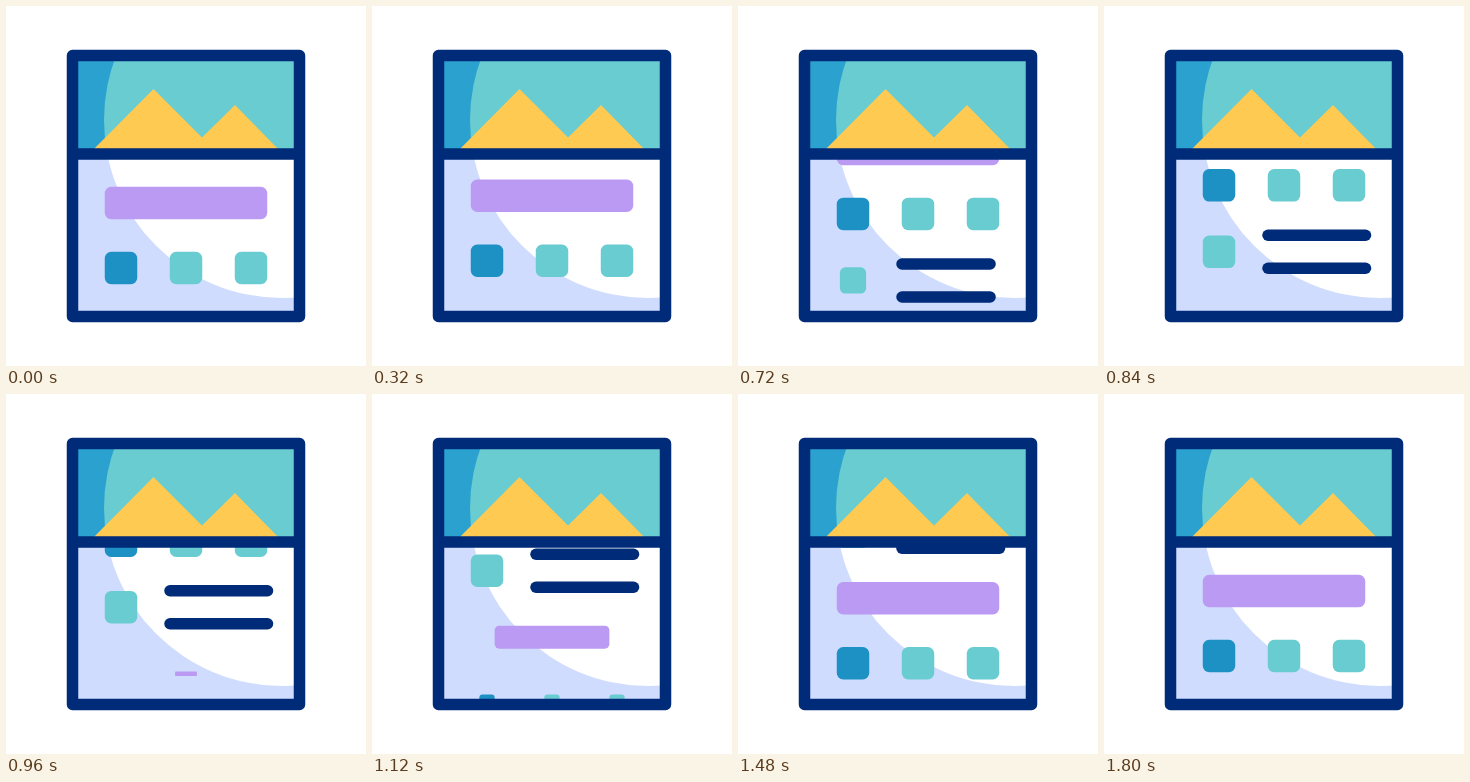
Recreate the animation shown at these times as an HTML page. Size 360 by 360 pixels, loop 2000 ms.

```html
<!DOCTYPE html>
<html lang="en">
<head>
<meta charset="utf-8">
<title>Scrolling page</title>
<style>
html, body { margin: 0; width: 100%; height: 100%; overflow: hidden; background: #fff; }
svg { display: block; width: 100vw; height: 100vh; }
</style>
</head>
<body>
<svg viewBox="0 0 360 360">
  <defs>
    <clipPath id="top"><path d="M66 49H294V148H66z"/></clipPath>
    <clipPath id="body"><path d="M66 148H294V310H66z"/></clipPath>
  </defs>
  <g clip-path="url(#top)">
    <path fill="#2aa1cf" d="M66 49H294V148H66z"/>
    <circle cx="276" cy="114" r="178" fill="#68ccd1"/>
    <path fill="#ffca51" d="M83 148 147.500 83 196 131.500 229 99 277 148z"/>
  </g>
  <g clip-path="url(#body)">
    <path fill="#d0dcfe" d="M66 148H294V310H66z"/>
    <circle cx="276" cy="114" r="178" fill="#fff"/>
    <g id="page"></g>
  </g>
  <path fill="none" stroke="#002b79" stroke-width="11.500" stroke-linejoin="round"
    d="M66.500 49.500H293.500V310.500H66.500zM66.500 148H293.500"/>
</svg>
<script>
const LOOP = 2000, STEP = 40, SCROLL_TIME = 1800, DISTANCE = 198, GROW_TIME = 390;
const TEAL = '#68ccd1', BLUE = '#1d90c4', PURPLE = '#bb9af4', NAVY = '#002b79';
const page = document.getElementById('page');
const growers = [];

const clamp = v => Math.min(1, Math.max(0, v));
const smooth = v => v * v * (3 - 2 * v);

// cubic-bezier(.6, 0, .4, 1), solved by bisection
function ease(x) {
  let lo = 0, hi = 1;
  for (let i = 0; i < 24; i++) {
    const s = (lo + hi) / 2, r = 1 - s;
    if (1.8 * r * r * s + 1.2 * r * s * s + s * s * s < x) lo = s; else hi = s;
  }
  return smooth(lo);
}

function add(tag, attrs) {
  const el = document.createElementNS('http://www.w3.org/2000/svg', tag);
  for (const key in attrs) el.setAttribute(key, attrs[key]);
  return page.appendChild(el);
}

// Boxes grow from their centre; without a start time they are always full size
function box(x, y, width, fill, start = -GROW_TIME) {
  const el = add('rect', { x: -width / 2, y: -16.25, width, height: 32.5, rx: 6.5, fill });
  growers.push([start, k => el.setAttribute('transform', `translate(${x} ${y}) scale(${k})`)]);
}

// Lines grow from their left end
function line(y, start) {
  const el = add('path', { stroke: NAVY, 'stroke-width': 11.5, 'stroke-linecap': 'round' });
  growers.push([start, k => el.setAttribute('d', k ? `M164 ${y}h${97.5 * k}` : '')]);
}

function section(y, barStart, boxStart) {
  box(180, y, 162.5, PURPLE, barStart);
  [BLUE, TEAL, TEAL].forEach((fill, i) => box(115 + 65 * i, y + 65, 32.5, fill, boxStart));
}

section(197);
box(115, 328.5, 32.5, TEAL, 440);
line(312, 405);
line(345, 405);
section(197 + DISTANCE, 870, 933);

function draw(now) {
  const t = Math.floor(now % LOOP / STEP) * STEP;
  const shift = DISTANCE * ease(clamp(t / SCROLL_TIME));
  page.setAttribute('transform', `translate(0 ${-shift})`);
  for (const [start, grow] of growers) grow(smooth(clamp((t - start) / GROW_TIME)));
}

let begin;
function tick(now) {
  begin ??= now;
  draw(now - begin);
  requestAnimationFrame(tick);
}
draw(0);
requestAnimationFrame(tick);
</script>
</body>
</html>
```
